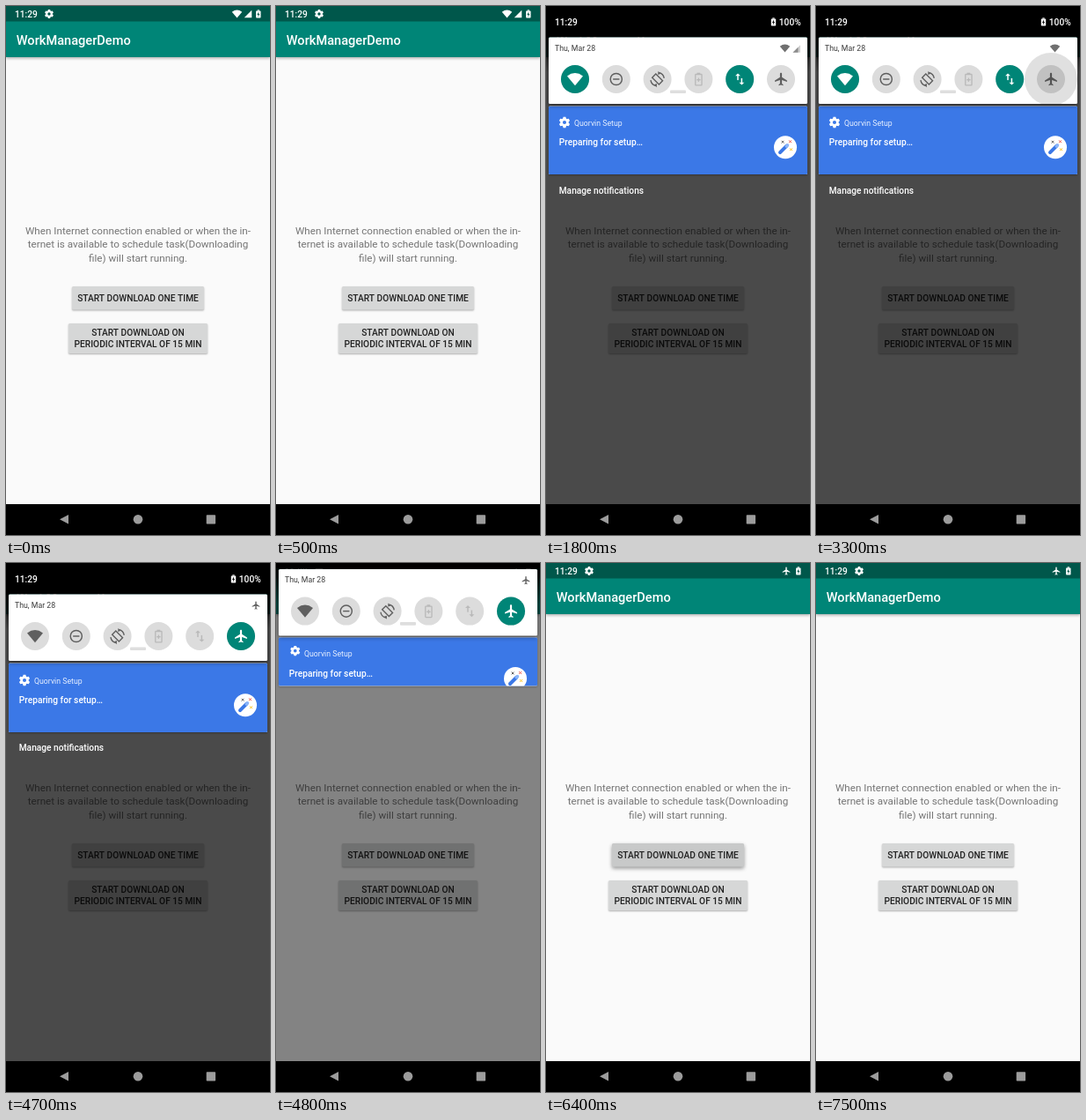
An HTML page with a canvas that plays this animation: 300 px wide and 600 px high, repeating every 8 s.

```html
<!DOCTYPE html>
<html lang="en">
<head>
<meta charset="utf-8">
<title>WorkManagerDemo</title>
<style>
html, body { margin: 0; width: 100%; height: 100%; overflow: hidden; background: #000; }
canvas { display: block; width: 100vw; height: 100vh; }
</style>
</head>
<body>
<canvas id="stage"></canvas>
<script>
const W = 300, H = 600, LOOP = 8000, STEP = 100, DP = 0.73;
const TEAL = '#008577', DARK_TEAL = '#00574b', BLUE = '#3b78e7';
const canvas = document.getElementById('stage');
const ctx = canvas.getContext('2d');
const dpr = window.devicePixelRatio || 1;
canvas.width = W * dpr;
canvas.height = H * dpr;

const PLANE = new Path2D('M21 16v-2l-8-5V3.5c0-.83-.67-1.5-1.5-1.5S10 2.67 10 3.5V9l-8 5v2l8-2.5V19l-2 1.5V22l3.5-1 3.5 1v-1.5L13 19v-5.5l8 2.5z');

const clamp = v => Math.max(0, Math.min(1, v));
const grey = (v, a = 1) => `rgba(${v},${v},${v},${a})`;
const mixGrey = (a, b, k) => grey(Math.round(a + (b - a) * k));

function rect(x, y, w, h, color) {
  ctx.fillStyle = color;
  ctx.fillRect(x, y, w, h);
}

function round(x, y, w, h, r, color) {
  ctx.fillStyle = color;
  ctx.beginPath();
  ctx.roundRect(x, y, w, h, r);
  ctx.fill();
}

function disc(x, y, r, color) {
  ctx.fillStyle = color;
  ctx.beginPath();
  ctx.arc(x, y, r, 0, Math.PI * 2);
  ctx.fill();
}

function poly(points, color) {
  ctx.fillStyle = color;
  ctx.beginPath();
  points.forEach(([x, y]) => ctx.lineTo(x, y));
  ctx.closePath();
  ctx.fill();
}

function line(points, color, width) {
  ctx.strokeStyle = color;
  ctx.lineWidth = width;
  ctx.beginPath();
  points.forEach(([x, y]) => ctx.lineTo(x, y));
  ctx.stroke();
}

function text(str, x, y, size, color, weight = 400, align = 'left') {
  ctx.font = `${weight} ${size}px Roboto, sans-serif`;
  ctx.textAlign = align;
  ctx.fillStyle = color;
  ctx.fillText(str, x, y);
}

function shadowed(alpha, blur, dy, draw) {
  ctx.save();
  ctx.shadowColor = grey(0, alpha);
  ctx.shadowBlur = blur * dpr;
  ctx.shadowOffsetY = dy * dpr;
  draw();
  ctx.restore();
}

function at(x, y, scale, draw) {
  ctx.save();
  ctx.translate(x, y);
  ctx.scale(scale, scale);
  draw();
  ctx.restore();
}

// Icons, drawn around their own centre

function wifi(x, y, w, color) {
  at(x, y, w, () => {
    ctx.fillStyle = color;
    ctx.beginPath();
    ctx.moveTo(0, 0.4);
    ctx.lineTo(-0.5, -0.2);
    ctx.quadraticCurveTo(0, -0.58, 0.5, -0.2);
    ctx.fill();
  });
}

function signal(x, y, s, color) {
  poly([[x - s / 2, y + s / 2], [x + s / 2, y - s / 2], [x + s / 2, y + s / 2]], color);
}

function plane(x, y, scale, color) {
  at(x, y, scale, () => {
    ctx.translate(-11.5, -12);
    ctx.fillStyle = color;
    ctx.fill(PLANE);
  });
}

function gear(x, y, r, color) {
  at(x, y, r, () => {
    ctx.fillStyle = color;
    ctx.beginPath();
    ctx.arc(0, 0, 0.76, 0, Math.PI * 2);
    ctx.arc(0, 0, 0.33, 0, Math.PI * 2, true);
    ctx.fill();
    for (let i = 0; i < 6; i++) {
      poly([[-0.33, -0.62], [-0.22, -1], [0.22, -1], [0.33, -0.62]], color);
      ctx.rotate(Math.PI / 3);
    }
  });
}

function battery(x, y, back) {
  round(x - 2.7, y - 3.6, 5.4, 8, 0.7, '#fff');
  rect(x - 1.2, y - 4.6, 2.4, 1.2, '#fff');
  poly([[x + 0.4, y - 2.5], [x - 1.5, y + 0.9], [x - 0.2, y + 0.9],
    [x - 0.4, y + 3.4], [x + 1.5, y - 0.1], [x + 0.4, y - 0.1]], back);
}

function disturb(x, y, color) {
  at(x, y, DP, () => {
    ctx.strokeStyle = color;
    ctx.lineWidth = 2;
    ctx.beginPath();
    ctx.arc(0, 0, 9, 0, Math.PI * 2);
    ctx.stroke();
    line([[-5, 0], [5, 0]], color, 2);
  });
}

function rotation(x, y, color) {
  at(x, y, DP, () => {
    ctx.rotate(-Math.PI / 4);
    ctx.strokeStyle = color;
    ctx.lineWidth = 1.9;
    ctx.strokeRect(-4, -7.5, 8, 15);
    ctx.rotate(Math.PI / 4);
    for (let i = 0; i < 2; i++) {
      ctx.beginPath();
      ctx.arc(0, 0, 10.6, -1.35, -0.15);
      ctx.stroke();
      poly([[1, -12.5], [1, -7], [5, -8.5]], color);
      ctx.rotate(Math.PI);
    }
  });
}

function saver(x, y, color) {
  at(x, y, DP, () => {
    ctx.strokeStyle = color;
    ctx.lineWidth = 1.8;
    ctx.beginPath();
    ctx.roundRect(-5, -7.5, 10, 17, 1);
    ctx.stroke();
    rect(-2.5, -10, 5, 2.5, color);
    line([[-3, 1], [3, 1]], color, 1.8);
    line([[0, -2], [0, 4]], color, 1.8);
  });
}

function dataArrows(x, y, color) {
  at(x, y, DP, () => {
    for (let i = 0; i < 2; i++) {
      rect(-4, -6, 2, 7.5, color);
      poly([[-7, -5], [-3, -9], [1, -5]], color);
      ctx.rotate(Math.PI);
    }
  });
}

function wand(x, y) {
  disc(x, y, 13, '#fff');
  ctx.lineCap = 'round';
  line([[x - 6, y + 6], [x + 1.5, y - 1.5]], BLUE, 4);
  line([[x + 1.3, y - 1.3], [x + 2.4, y - 2.4]], '#8ab4f8', 3.6);
  ctx.lineCap = 'butt';
  [[-3, -6, '#555'], [5.5, -6.5, '#ea4335'], [6.5, 2.5, '#fbbc05']].forEach(([dx, dy, c]) => {
    line([[x + dx - 1.4, y + dy - 1.4], [x + dx + 1.4, y + dy + 1.4]], c, 0.9);
    line([[x + dx + 1.4, y + dy - 1.4], [x + dx - 1.4, y + dy + 1.4]], c, 0.9);
  });
}

// App screen

function button(x, y, w, h, pressed) {
  shadowed(pressed ? 0.4 : 0.3, pressed ? 4 : 2, pressed ? 2 : 1,
    () => round(x, y, w, h, 1.5, '#d6d7d7'));
  if (pressed) round(x, y, w, h, 1.5, grey(0, 0.13 * pressed));
}

function app(t) {
  rect(0, 0, W, 565, '#fafafa');
  shadowed(0.3, 3, 1.5, () => rect(0, 0, W, 58, TEAL));
  rect(0, 0, W, 17.5, DARK_TEAL);
  text('11:29', 10, 12.7, 10.2, '#fff', 500);
  gear(49, 9, 5, '#fff');
  if (t < 3500) {
    wifi(262.5, 9, 11.5, '#fff');
    signal(275, 9, 8.5, '#fff');
  } else {
    plane(273, 9, 0.46, '#fff');
  }
  battery(286.8, 9, DARK_TEAL);
  text('WorkManagerDemo', 11.7, 43.5, 14.6, '#fff', 500);

  ['When Internet connection enabled or when the in-',
    'ternet is available to schedule task(Downloading',
    'file) will start running.'
  ].forEach((s, i) => text(s, 150, 259 + i * 15.3, 11.68, '#757575', 400, 'center'));

  const press = t >= 6400 && t < 6700 ? clamp((t - 6300) / 200) : 0;
  button(75, 318, 150, 26.5, press);
  text('START DOWNLOAD ONE TIME', 150, 334.7, 10.2, '#212121', 500, 'center');
  button(71, 360, 158, 34, 0);
  text('START DOWNLOAD ON', 150, 373.8, 10.2, '#212121', 500, 'center');
  text('PERIODIC INTERVAL OF 15 MIN', 150, 387.3, 10.2, '#212121', 500, 'center');
}

function navBar() {
  rect(0, 565, W, 35, '#000');
  poly([[61, 582.3], [71, 577], [71, 587.6]], '#9c9c9c');
  disc(150, 582.3, 5.3, '#9c9c9c');
  round(227.7, 577.2, 10.4, 10.4, 0.8, '#9c9c9c');
}

// Notification shade

function notification(t, p, top) {
  const dy = t >= 4600 && t < 4800 ? 1 : 0;
  const h = 22 + 55.5 * p + dy;
  const blue = clamp(p * 3);
  shadowed(0.3, 2, 1, () => round(3, top, 294, h, 1.5, '#fff'));
  ctx.save();
  ctx.beginPath();
  ctx.roundRect(3, top, 294, h, 1.5);
  ctx.clip();
  ctx.globalAlpha = blue;
  rect(3, top, 294, h, BLUE);
  text('Quorvin Setup', 32, top + 22 + dy, 8.76, '#e8f0ff');
  text('Preparing for setup…', 14.7, top + 44.5 + dy, 10.2, '#fff', 500);
  wand(272, top + 46.7 + dy);
  ctx.globalAlpha = 1;
  gear(23 - 2 * p, top + 10.5 + 8 * p + dy, 4.8 + 1.4 * p, mixGrey(97, 255, blue));
  ctx.restore();
}

function tile(x, on) {
  disc(x, 83, 16, '#dcdcdc');
  ctx.globalAlpha = on;
  disc(x, 83, 16, TEAL);
  ctx.globalAlpha = 1;
}

function quickSettings(t) {
  const flight = clamp((t - 3600) / 400);
  rect(0, -100, W, 135, '#000');
  const fade = ctx.createLinearGradient(0, 35, 0, 75);
  fade.addColorStop(0, '#000');
  fade.addColorStop(1, grey(0, 0));
  rect(0, 35, 3, 40, fade);
  rect(297, 35, 3, 40, fade);
  text('11:29', 10, 21.6, 10.2, '#fff', 500);
  battery(258.5, 18, '#000');
  text('100%', 264.8, 21.6, 10.2, '#fff', 500);

  shadowed(0.4, 5, 2, () => round(3, 35.5, 294, 75.5, 1.5, '#fff'));
  text('Thu, Mar 28', 10, 50.6, 8.76, '#3c3c3c');
  if (t < 3500) wifi(271.5, 48, 11.5, '#707070');
  else plane(284, 48, 0.46, '#606060');
  if (t < 3100) {
    signal(284.7, 48.5, 8.5, '#cfcfcf');
    poly([[280.5, 52.8], [286.5, 46.8], [286.5, 52.8]], '#8c8c8c');
  }

  const [wifiOn, dataOn] = [1 - flight, 1 - flight];
  [wifiOn, 0, 0, 0, dataOn, flight].forEach((on, i) => tile(33 + i * 46.8, on));
  wifi(33, 83, 18, mixGrey(95, 255, wifiOn));
  disturb(79.8, 83, '#5f5f5f');
  rotation(126.6, 83, '#5f5f5f');
  saver(173.4, 83, '#b9b9b9');
  dataArrows(220.2, 83, mixGrey(185, 255, dataOn));
  plane(267, 83, DP, mixGrey(95, 255, flight));
  round(141, 95.5, 18, 3.6, 1, '#dedede');

  if (t >= 2700 && t < 3500) {
    const fadeOut = t >= 3400 ? 0.5 : 1;
    ctx.save();
    ctx.beginPath();
    ctx.rect(3, 35.5, 294, 75.5);
    ctx.clip();
    disc(267, 83, 9 + 21 * clamp((t - 2700) / 500), grey(0, 0.12 * fadeOut));
    ctx.restore();
  }
}

function shade(t) {
  if (t < 1400 || t >= 5000) return;
  const p = t < 4700
    ? 1 - (1 - clamp((t - 1400) / 400)) ** 2
    : 1 - clamp((t - 4700) / 250);
  const shift = -71 * (1 - p);
  rect(0, 0, W, 565, grey(0, 0.15 + 0.55 * p));
  if (p > 0.6) {
    ctx.globalAlpha = clamp((p - 0.6) / 0.4);
    text('Manage notifications', 14.7, 212.7 + shift, 10.2, '#fff', 500);
    ctx.globalAlpha = 1;
  }
  notification(t, p, 111.5 + shift + 2 * p);
  ctx.save();
  ctx.translate(0, shift);
  quickSettings(t);
  ctx.restore();
}

function draw(now) {
  const t = Math.floor((now % LOOP) / STEP) * STEP;
  ctx.setTransform(dpr, 0, 0, dpr, 0, 0);
  app(t);
  shade(t);
  navBar();
}

const start = performance.now();
function tick() {
  draw(performance.now() - start);
  requestAnimationFrame(tick);
}
tick();
</script>
</body>
</html>
```
